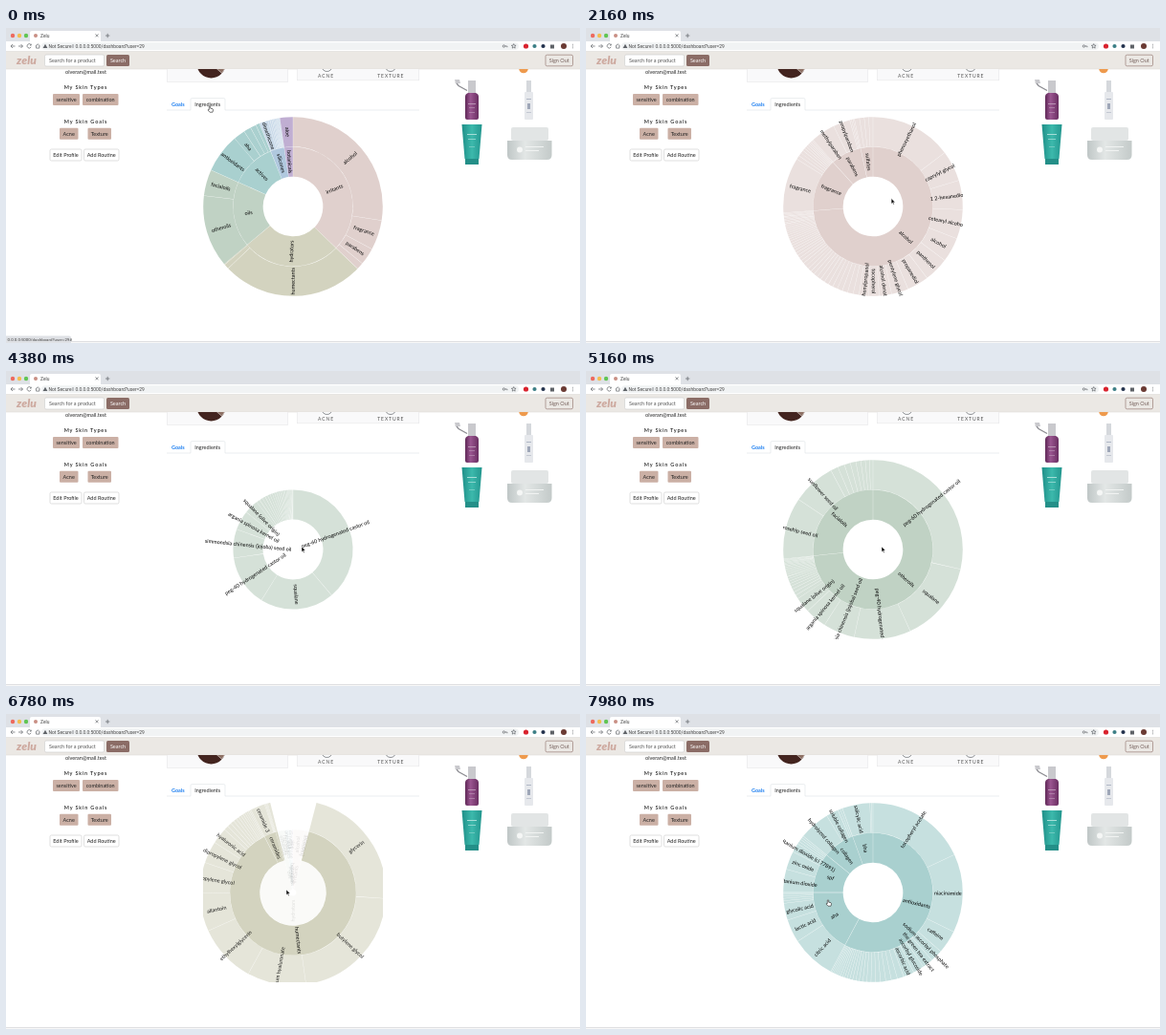
Animation, 600 px wide and 330 px high, one loop 8 s. Source, as an HTML page:

```html
<!DOCTYPE html>
<html lang="en">
<head>
<meta charset="utf-8">
<title>Skin dashboard</title>
<style>
  html, body { margin: 0; width: 100%; height: 100%; overflow: hidden; background: #fff; }
  svg { display: block; }
  text { font: 5.5px Lato, "Open Sans", sans-serif; fill: #222; }
  .mid text, text.mid { text-anchor: middle; }
  .chrome text { font: 4.9px Roboto, sans-serif; fill: #444; }
  .head text { font-weight: 500; letter-spacing: .85px; fill: #111; }
  .caps text { font-size: 5px; letter-spacing: .9px; fill: #555; }
  .line { fill: none; stroke: #5f6368; stroke-width: .7; }
  .tag { fill: #cbb0a5; }
  .button { fill: #fff; stroke: #ccc; stroke-width: .6; }
  .card { fill: #f9f9fa; stroke: #e3e3e5; stroke-width: .5; }
  #labels text { text-anchor: middle; fill: #000; }
</style>
</head>
<body>
<svg id="stage" width="600" height="330" viewBox="0 0 600 330">
  <defs>
    <linearGradient id="glass"><stop stop-color="#bfc6c6"/><stop offset=".4" stop-color="#e3e7e6"/><stop offset="1" stop-color="#c3cac9"/></linearGradient>
    <linearGradient id="plum"><stop stop-color="#5f2857"/><stop offset=".4" stop-color="#9a5590"/><stop offset="1" stop-color="#6a2f62"/></linearGradient>
    <linearGradient id="teal"><stop stop-color="#1f8f88"/><stop offset=".5" stop-color="#3cb9ac"/><stop offset="1" stop-color="#23968e"/></linearGradient>
    <clipPath id="below"><path d="M0 43H600V330H0Z"/></clipPath>
  </defs>

  <g class="chrome">
    <path fill="#dee1e6" d="M0 0H600V14H0Z"/>
    <circle cx="7" cy="8" r="2.2" fill="#ed6a5e"/>
    <circle cx="14" cy="8" r="2.2" fill="#f4be4f"/>
    <circle cx="21" cy="8" r="2.2" fill="#61c554"/>
    <path fill="#fff" d="M25 14V5q0-2 2-2H97q2 0 2 2V14H600V25H0V14Z"/>
    <circle cx="31" cy="8" r="2" fill="#c98f84"/>
    <text x="36" y="9.7">Zelu</text>
    <path class="line" d="M93.5 6.3l3 3m0-3l-3 3M104 8h4.4M106.2 5.8v4.4"/>
    <path class="line" d="M9.5 19H5m2-2l-2 2 2 2M13 19h4.5m-2-2l2 2-2 2M26 17.5a2.2 2.2 0 1 0 .2 2.4m.1-3.2v1.4h-1.4M30.8 19l2.4-2.2 2.4 2.2m-4 -.4v2.5h3.2v-2.5"/>
    <rect x="37" y="15.2" width="499" height="7.8" rx="3.9" fill="#f1f3f4"/>
    <path fill="#5f6368" d="M38.6 21L41 16.8 43.4 21Z"/>
    <text x="44.5" y="20.8">Not Secure</text>
    <path class="line" stroke-width=".4" d="M70 17v4"/>
    <text x="72.5" y="20.8">0.0.0.0:5000/dashboard?user=29</text>
    <path class="line" d="M521.7 19h2.2v1.2"/><circle class="line" cx="520.4" cy="19" r="1.2"/>
    <path class="line" d="M530.7 16.6l.7 1.6 1.7.1-1.3 1.1.4 1.7-1.5-.9-1.5.9.4-1.7-1.3-1.1 1.7-.1Z"/>
    <circle cx="543.5" cy="19" r="2.6" fill="#d9232e"/>
    <circle cx="552.5" cy="19" r="2.1" fill="#3d7f86"/>
    <circle cx="561.5" cy="19" r="2.1" fill="#23324d"/>
    <path fill="#5f6368" d="M569 17.5h4v4h-4Z"/>
    <circle cx="583" cy="19" r="3" fill="#6b3b34"/>
    <path class="line" stroke-dasharray=".9 .9" stroke-width="1" d="M592.5 16.8v4.6"/>
  </g>

  <path fill="#ebe8e4" d="M0 24.5H600V43H0Z"/>
  <path stroke="#d9d6d3" stroke-width=".5" d="M0 24.5H600M0 43H600"/>
  <text x="11" y="37.5" style="font:italic 900 12px Lato,sans-serif;fill:#cda99f">zelu</text>
  <rect class="button" x="40.5" y="28" width="62" height="12" rx="1.5"/>
  <text x="45" y="36" style="fill:#555">Search for a product</text>
  <rect x="105" y="28" width="24" height="12" rx="1.5" fill="#8b6c66"/>
  <text class="mid" x="117" y="36" style="fill:#fff">Search</text>
  <rect x="564" y="28.2" width="28.5" height="11.6" rx="1.5" fill="none" stroke="#8b6c66" stroke-width=".6"/>
  <text class="mid" x="578.2" y="36" style="fill:#75605b">Sign Out</text>

  <g class="mid">
    <text x="83.5" y="47.6">olveran@mail.test</text>
    <g class="head"><text x="83.5" y="64.3">My Skin Types</text><text x="83.5" y="99.8">My Skin Goals</text></g>
    <rect class="tag" x="49" y="69" width="28" height="12" rx="1"/><text x="63" y="77">sensitive</text>
    <rect class="tag" x="80" y="69" width="37.5" height="12" rx="1"/><text x="98.7" y="77">combination</text>
    <rect class="tag" x="56" y="104.8" width="19.5" height="12" rx="1"/><text x="65.7" y="112.8">Acne</text>
    <rect class="tag" x="85.5" y="104.8" width="24.5" height="12" rx="1"/><text x="97.7" y="112.8">Texture</text>
    <rect class="button" x="46" y="127" width="33" height="12" rx="1.5"/><text x="62.5" y="135">Edit Profile</text>
    <rect class="button" x="81.5" y="127" width="36.5" height="12" rx="1.5"/><text x="99.7" y="135">Add Routine</text>
  </g>

  <g clip-path="url(#below)">
    <rect class="card" x="168.3" y="30" width="126.5" height="26.5"/>
    <circle cx="214.5" cy="37.5" r="15" fill="#43241f"/>
    <path fill="#8d7064" stroke="#fff" stroke-width=".5" d="M214.5 37.5l11.2 10a15 15 0 0 0 3.8-10Z"/>
    <rect class="card" x="304.3" y="30" width="127.5" height="24.8"/>
    <circle class="line" cx="335.5" cy="40" r="5.5"/><circle class="line" cx="402" cy="40" r="5.5"/>
    <g class="caps mid"><text x="334.5" y="52.2">ACNE</text><text x="402.3" y="52.2">TEXTURE</text></g>
    <circle cx="541" cy="42.5" r="4.8" fill="#ee9a4d"/>
  </g>

  <path fill="none" stroke="#dee2e6" stroke-width=".6" d="M168 86H193V75q0-1.5 1.5-1.5H227.500q1.500 0 1.500 1.500V86H432"/>
  <text x="173" y="81.6" style="font-weight:700;fill:#1a7df0">Goals</text>
  <text x="197.3" y="81.6">Ingredients</text>

  <g>
    <path fill="none" stroke="#8d8d92" stroke-width="1.300" d="M470 56.500l3 4 9 5"/>
    <path fill="#c9c9cd" d="M469 54h5l1 4h-5ZM483 55h8v13h-8Z"/>
    <path fill="url(#plum)" d="M480 72q0-3 3-4h8q3 1 3 4V94q0 2-2 2H482q-2 0-2-2Z"/>
    <path fill="#c9aac5" d="M483 79h8v.8h-8Zm1 4h6v.6h-6Zm0 5h6v.6h-6Z"/>
    <path fill="#d5d8dc" d="M544 55h5v12h-5Z"/>
    <rect x="542" y="67" width="9" height="29" rx="1" fill="#e6e8ec"/>
    <path fill="#9fa7b8" d="M544 74h5v.8h-5Zm1 5h3v6h-3Zm-1 9h5v.6h-5Z"/>
    <path fill="url(#teal)" d="M476.500 101H497.500L494.500 137H479.500Z"/>
    <path fill="#248f88" d="M480 137h14v6h-14Z"/>
    <path fill="#a5ded7" d="M482 111h10v.9h-10Zm1 5h8v.7h-8Zm1 8h6v.6h-6Z"/>
    <rect x="528" y="104" width="39" height="14" rx="2" fill="#e2e5e5"/>
    <path fill="url(#glass)" d="M524 118H570.500V133q0 5-5 5H529q-5 0-5-5Z"/>
    <circle cx="537" cy="127.500" r="3" fill="#f5f6f5"/>
    <path fill="#f1f3f2" d="M543 124h19v1h-19Zm0 4h14v1h-14Z"/>
  </g>

  <path stroke="#d8d8da" stroke-width="1" d="M0 328.700H600"/>
  <g id="status" class="chrome">
    <path fill="#dfe1e5" d="M0 322.500H66q2 0 2 2V330H0Z"/>
    <text x="1.500" y="328.300" style="font-size:4.400px">0.0.0.0:5000/dashboard?user=29#</text>
  </g>

  <svg x="206" y="93" width="188" height="188" viewBox="-94 -94 188 188">
    <g id="arcs"></g><g id="labels"></g>
  </svg>

  <g id="cursor" stroke-linejoin="round">
    <path id="arrow" fill="#000" stroke="#fff" stroke-width=".5" d="M0 0V5.600L1.300 4.400 2.200 6.400 3.100 6 2.200 4.100H4Z"/>
    <path id="hand" fill="#fff" stroke="#222" stroke-width=".6" d="M-.7 3.500V.1Q0-.9.700.1V2.200L3 2.700Q3.600 3 3.500 4L3 6.200H0L-2 4Q-1.800 3-.700 3.700Z"/>
  </g>
</svg>

<script>
const RING = 31.33, TAU = 2 * Math.PI, LOOP = 8000, ZOOM_MS = 750;
const el = id => document.getElementById(id);

// Named leaves "name:size|...", followed by `count` shrinking unnamed ones sharing `rest`.
function leaves(list, count = 0, rest = 0, ratio = .94) {
  const named = list ? list.split('|').map(s => s.split(':')).map(([n, v]) => [n, +v]) : [];
  const first = rest * (1 - ratio) / (1 - ratio ** count);
  return named.concat(Array.from({ length: count }, (_, i) => ['', first * ratio ** i]));
}

// [name, size among siblings, children, colour]
const tree = [
  ['irritants', 134, [
    ['alcohol', 266, leaves('phenoxyethanol:53|caprylyl glycol:20|1 2-hexanediol:19|cetearyl alcohol:19|alcohol:16|panthenol:16|propanediol:14|pentylene glycol:11|alcohol denat:8|tocopherol:7|phenylpropanol:6', 40, 77, .96)],
    ['fragrance', 52, leaves('fragrance:36', 10, 16, .9)],
    ['parabens', 30, leaves('methylparaben:16|propylparaben:11', 3, 3)],
    ['sulfates', 12, leaves('', 4, 12)],
  ], '#cbb1ac'],
  ['hydrators', 96, [
    ['humectants', 346, leaves('glycerin:86|butylene glycol:85|sodium hyaluronate:40|ethylhexylglycerin:40|allantoin:26|propylene glycol:21|dipropylene glycol:15|hyaluronic acid:11', 12, 22, .9)],
    ['ceramides', 12, leaves('ceramide 3:10', 3, 2)],
    ['', 2, leaves('', 1, 1)],
  ], '#b6b694'],
  ['oils', 64, [
    ['otheroils', 264, leaves('peg-60 hydrogenated castor oil:140|squalane:72|peg-40 hydrogenated castor oil:50|simmondsia chinensis (jojoba) seed oil:28|argania spinosa kernel oil:19|squalane (olive origin):14', 20, 37, .93)],
    ['facialoils', 96, leaves('rosehip seed oil:40|sunflower seed oil:28', 8, 28, .9)],
  ], '#96b49d'],
  ['actives', 44, [
    ['antioxidants', 208, leaves('tocopheryl acetate:65|niacinamide:51|caffeine:15|sodium ascorbyl phosphate:8|the green tea extract:7|ascorbyl glucoside:7|ascorbic acid:7', 22, 48, .93)],
    ['aha', 62, leaves('citric acid:29|lactic acid:15|glycolic acid:11', 5, 7, .9)],
    ['spf', 39, leaves('titanium dioxide:15|zinc oxide:12|titanium dioxide (ci 77891):6', 4, 6, .9)],
    ['collagen', 31, leaves('hydrolyzed collagen:20|soluble collagen:8', 2, 3)],
    ['bha', 20, leaves('salicylic acid:18', 2, 2)],
  ], '#71b1af'],
  ['silicones', 13.5, leaves('dimethicone:155', 12, 205, .85), '#7ba3c8'],
  ['botanicals', 8.5, [['aloe', 1, leaves('aloe:1')]], '#9678b4'],
];

const root = { x0: 0, x1: 1, depth: 0 }, nodes = [];
function place(items, x0, x1, depth, inherited) {
  const unit = (x1 - x0) / items.reduce((sum, item) => sum + item[1], 0);
  for (const [name, size, kids, color = inherited] of items) {
    const node = { name, x0, x1: x0 + size * unit, depth, color, leaf: !kids };
    nodes.push(node);
    if (kids) place(kids, x0, node.x1, depth + 1, color);
    x0 = node.x1;
  }
}
place(tree, 0, 1, 1);

const make = (tag, parent, attrs) => {
  const e = parent.appendChild(document.createElementNS('http://www.w3.org/2000/svg', tag));
  for (const key in attrs) e.setAttribute(key, attrs[key]);
  return e;
};
const zooms = [[-1000, ''], [300, 'irritants'], [2350, ''], [3420, 'otheroils'], [4310, 'oils'],
  [5210, ''], [5900, 'hydrators'], [6560, ''], [7200, 'actives']]
  .map(([start, name]) => ({ start, focus: name ? nodes.find(n => n.name === name) : root }));

// Geometry and opacities of a node once the chart rests on `focus`.
function pose(node, focus) {
  const angle = x => Math.max(0, Math.min(1, (x - focus.x0) / (focus.x1 - focus.x0))) * TAU;
  const a0 = angle(node.x0), a1 = angle(node.x1);
  const y0 = Math.max(0, node.depth - focus.depth), y1 = Math.max(0, node.depth + 1 - focus.depth);
  const shown = y0 >= 1 && y1 <= 3 && a1 - a0 > 1e-6;
  return [a0, a1, y0, y1, shown ? (node.leaf ? .4 : .6) : 0, shown && a1 - a0 > .09 ? 1 : 0];
}
for (const node of nodes) {
  node.poses = zooms.map(z => pose(node, z.focus));
  node.path = make('path', el('arcs'), { fill: node.color });
  if (node.name) {
    node.text = make('text', el('labels'), { dy: '.35em' });
    node.text.textContent = node.name;
  }
}

const cubic = t => t < .5 ? 4 * t ** 3 : 1 - 4 * (1 - t) ** 3;

// Each zoom starts from wherever the previous one had got to.
function poseAt(node, progress) {
  let now = node.poses[0];
  for (let i = 1; i < progress.length; i++)
    now = now.map((v, k) => v + (node.poses[i][k] - v) * progress[i]);
  return now;
}

function arc(a0, a1, y0, y1) {
  const inner = y0 * RING, outer = Math.max(inner, y1 * RING - .2);
  const pad = Math.min((a1 - a0) / 2, .006) * RING * .75;
  const point = (r, a) => `${(r * Math.sin(a)).toFixed(3)} ${(-r * Math.cos(a)).toFixed(3)}`;
  const edge = (r, sweep) => {
    const p = Math.min(r ? pad / r : 0, (a1 - a0) / 2), mid = (a0 + a1) / 2;
    const ends = sweep ? [a0 + p, a1 - p] : [a1 - p, a0 + p];
    const curve = a => `A${r} ${r} 0 0 ${sweep} ${point(r, a)}`;
    return point(r, ends[0]) + curve(mid) + curve(ends[1]);
  };
  return `M${edge(outer, 1)}L${inner > .01 ? edge(inner, 0) : '0 0'}Z`;
}

function drawChart(t) {
  const begun = zooms.filter(z => z.start <= t);
  const progress = begun.map((z, i) => {
    const end = i + 1 < begun.length ? begun[i + 1].start : t;
    return cubic(Math.min(1, (end - z.start) / ZOOM_MS));
  });
  for (const node of nodes) {
    const [a0, a1, y0, y1, fill, label] = poseAt(node, progress);
    const visible = fill > .002 && a1 - a0 > 1e-5 && y1 > .01;
    node.path.setAttribute('d', visible ? arc(a0, a1, y0, y1) : '');
    node.path.setAttribute('fill-opacity', fill);
    if (!node.text) continue;
    node.text.style.display = label > .002 ? '' : 'none';
    node.text.setAttribute('fill-opacity', label);
    const deg = (a0 + a1) * 90 / Math.PI, r = (y0 + y1) / 2 * RING;
    node.text.setAttribute('transform', `rotate(${deg - 90}) translate(${r}) rotate(${deg < 180 ? 0 : 180})`);
  }
}

const route = [[0, 213, 82], [40, 213, 82], [300, 345, 178], [1080, 348, 180], [1900, 348, 180], [2300, 308, 178],
  [3000, 308, 178], [3400, 226, 211], [3750, 226, 211], [4200, 309, 184], [5300, 309, 184], [5800, 304, 238],
  [6050, 304, 238], [6450, 293, 184], [6800, 293, 184], [7180, 267, 157], [7450, 267, 157], [7900, 253, 195], [LOOP, 253, 195]];

function drawCursor(t) {
  const i = route.findIndex(p => p[0] > t), [t0, x0, y0] = route[i - 1], [t1, x1, y1] = route[i];
  const u = (t - t0) / (t1 - t0), k = u * u * (3 - 2 * u);
  const x = x0 + (x1 - x0) * k, y = y0 + (y1 - y0) * k;
  const onTab = x > 193 && x < 229 && y < 86, reach = Math.hypot(x - 300, y - 187);
  const hand = onTab || (reach > RING && reach < 3 * RING);
  el('cursor').setAttribute('transform', `translate(${x} ${y})`);
  el('hand').style.display = hand ? '' : 'none';
  el('arrow').style.display = hand ? 'none' : '';
  el('status').style.display = t < 300 ? '' : 'none';
}

const begin = performance.now();
function frame() {
  const t = (performance.now() - begin) % LOOP;
  drawChart(t);
  drawCursor(t);
  requestAnimationFrame(frame);
}
frame();
</script>
</body>
</html>
```
